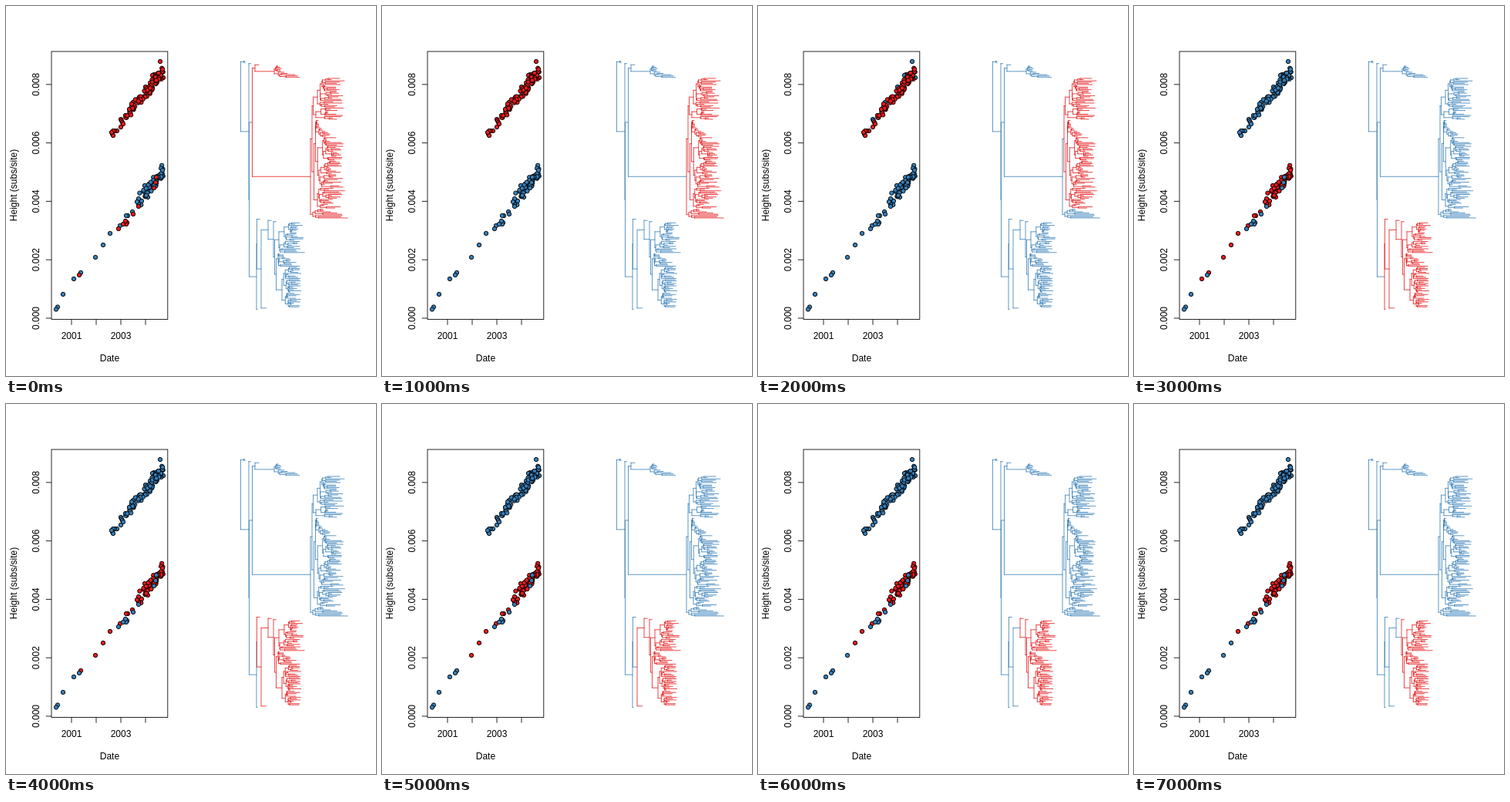
Animation of 480 by 480 pixels, one loop 8 s. Source, as an HTML page with a canvas:

```html
<!DOCTYPE html>
<html lang="en">
<head>
<meta charset="utf-8">
<style>
  html, body { margin: 0; width: 100%; height: 100%; overflow: hidden; background: #fff; }
  canvas { display: block; }
</style>
</head>
<body>
<canvas id="stage" width="480" height="480"></canvas>
<script>
const ctx = document.getElementById('stage').getContext('2d');
const RED = '#e41a1c', BLUE = '#377eb8';

let seed = 11;
function rand() {
  seed = (seed + 0x6d2b79f5) | 0;
  let t = Math.imul(seed ^ (seed >>> 15), 1 | seed);
  t = (t + Math.imul(t ^ (t >>> 7), 61 | t)) ^ t;
  return ((t ^ (t >>> 14)) >>> 0) / 4294967296;
}

// A tip's height in the scatter plot also sets how far right it reaches in the tree.
const tip = (px, py) => ({ px, py, x: 309.5 + (393.5 - py) * 0.4155 });
const fork = (x, a, b) => ({ x, kids: [a, b] });
const tips = points => points.map(p => tip(...p));

function bush(x, leaves) {
  if (leaves.length === 1) return leaves[0];
  const n = leaves.length;
  const cut = Math.min(n - 1, Math.max(1, Math.round(n * (0.2 + 0.6 * rand()))));
  const grow = part => {
    const room = Math.min(...part.map(t => t.x)) - x;
    return bush(x + room * rand() * 0.6, part);
  };
  return fork(x, grow(leaves.slice(0, cut)), grow(leaves.slice(cut)));
}

function cloud(n, x0, power, yAt, spread) {
  return Array.from({ length: n }, () => {
    const px = x0 + (204 - x0) * rand() ** power;
    return tip(px, yAt(px) + (rand() + rand() - 1) * spread);
  });
}
const high = n => cloud(n, 154, 0.75, x => 165 - (x - 139) * 1.215, 9);
const low = n => cloud(n, 169, 0.55, x => 310 - (x - 126) * 1.24, 11);

const sideClade = bush(348, tips([[146, 289], [152, 283], [155, 279], [156, 283], [157, 281],
  [165, 270], [172, 260], [192, 236], [194, 229], [195, 222]]));
const earlyHigh = tips([[137, 164], [139, 168], [138, 166], [139, 162], [141, 162], [144, 162],
  [149, 157], [152, 153], [151, 151], [155, 142], [160, 134], [163, 127]]);
const lateHigh = tips([[150, 149], [149, 147], [165, 125], [181, 105], [190, 90], [192, 89],
  [204, 93], [200, 72]]);
const earlyLow = tips([[148, 285], [156, 272], [158, 272], [164, 267], [170, 254], [172, 250],
  [176, 253], [180, 233], [184, 248]]);

const core = fork(397,
  fork(398.5, bush(404, high(24)), bush(402, high(10))),
  fork(399.5, bush(401.5, [...earlyHigh, ...high(43)]), bush(404, high(17))));
const main = fork(395, core, bush(398, lateHigh));
const upper = fork(319.5, fork(323, tip(95, 349), sideClade), main);

const inner = fork(347, tip(135, 295),
  fork(348.5, bush(354, low(25)),
    fork(357, bush(353, [...earlyLow, ...low(2)]), bush(358, low(33)))));
inner.kids[1].kids[1].x = 350.5;
const mid = fork(340, tip(126, 310), inner);
const wide = fork(331, mid, tip(116, 326));
const trunk = fork(325.4, tip(97, 346), wide);
const lower = fork(325, trunk, tip(88, 354));

const root = fork(304.5,
  fork(308.5, tip(65, 393.5), tip(67, 390.5)),
  fork(315, tip(74, 374), fork(315.5, upper, lower)));

const leaves = [];
(function place(node) {
  if (node.kids) {
    node.kids.forEach(place);
    node.y = (node.kids[0].y + node.kids[1].y) / 2;
  } else {
    node.y = 71.5 + 1.602 * leaves.length;
    leaves.push(node);
  }
})(root);

// The highlighted clade, one per second.
const steps = [upper, main, core, lower, trunk, wide, mid, inner];

function line(x1, y1, x2, y2) {
  ctx.beginPath();
  ctx.moveTo(x1, y1);
  ctx.lineTo(x2, y2);
  ctx.stroke();
}

function label(text, x, y, turned) {
  ctx.save();
  ctx.translate(x, y);
  if (turned) ctx.rotate(-Math.PI / 2);
  ctx.fillText(text, 0, 0);
  ctx.restore();
}

function drawAxes() {
  ctx.strokeStyle = ctx.fillStyle = '#000';
  ctx.lineWidth = 0.85;
  ctx.font = '12px "Liberation Sans", Arial, sans-serif';
  ctx.textAlign = 'center';
  ctx.strokeRect(59, 59, 150.8, 347.5);
  for (let i = 0; i < 5; i++) {
    const y = 405 - i * 75.8;
    line(51.8, y, 59, y);
    label((i * 0.002).toFixed(3), 43, y, true);
  }
  for (let i = 0; i < 4; i++) {
    const x = 85 + i * 32;
    line(x, 406.5, x, 413.7);
    if (i % 2 === 0) label(2001 + i, x, 432);
  }
  label('Date', 134.4, 461);
  label('Height (subs/site)', 13.5, 232.5, true);
}

function drawTree(node, marked, lit) {
  lit = lit || node === marked;
  node.color = lit ? RED : BLUE;
  if (!node.kids) return;
  const [a, b] = node.kids;
  ctx.strokeStyle = node.color;
  line(node.x, a.y, node.x, b.y);
  for (const kid of node.kids) {
    ctx.strokeStyle = node.color;
    line(node.x, kid.y, kid.x, kid.y);
    drawTree(kid, marked, lit);
  }
}

function drawDots() {
  ctx.strokeStyle = '#000';
  ctx.lineWidth = 0.9;
  for (let i = leaves.length - 1; i >= 0; i--) {
    const { px, py, color } = leaves[i];
    ctx.fillStyle = color;
    ctx.beginPath();
    ctx.arc(px, py, 2.7, 0, 2 * Math.PI);
    ctx.fill();
    ctx.stroke();
  }
}

function frame() {
  const marked = steps[Math.floor(performance.now() / 1000) % steps.length];
  ctx.fillStyle = '#fff';
  ctx.fillRect(0, 0, 480, 480);
  drawAxes();
  ctx.lineWidth = 0.8;
  ctx.lineCap = 'round';
  drawTree(root, marked, false);
  ctx.lineCap = 'butt';
  drawDots();
  requestAnimationFrame(frame);
}
frame();
</script>
</body>
</html>
```
